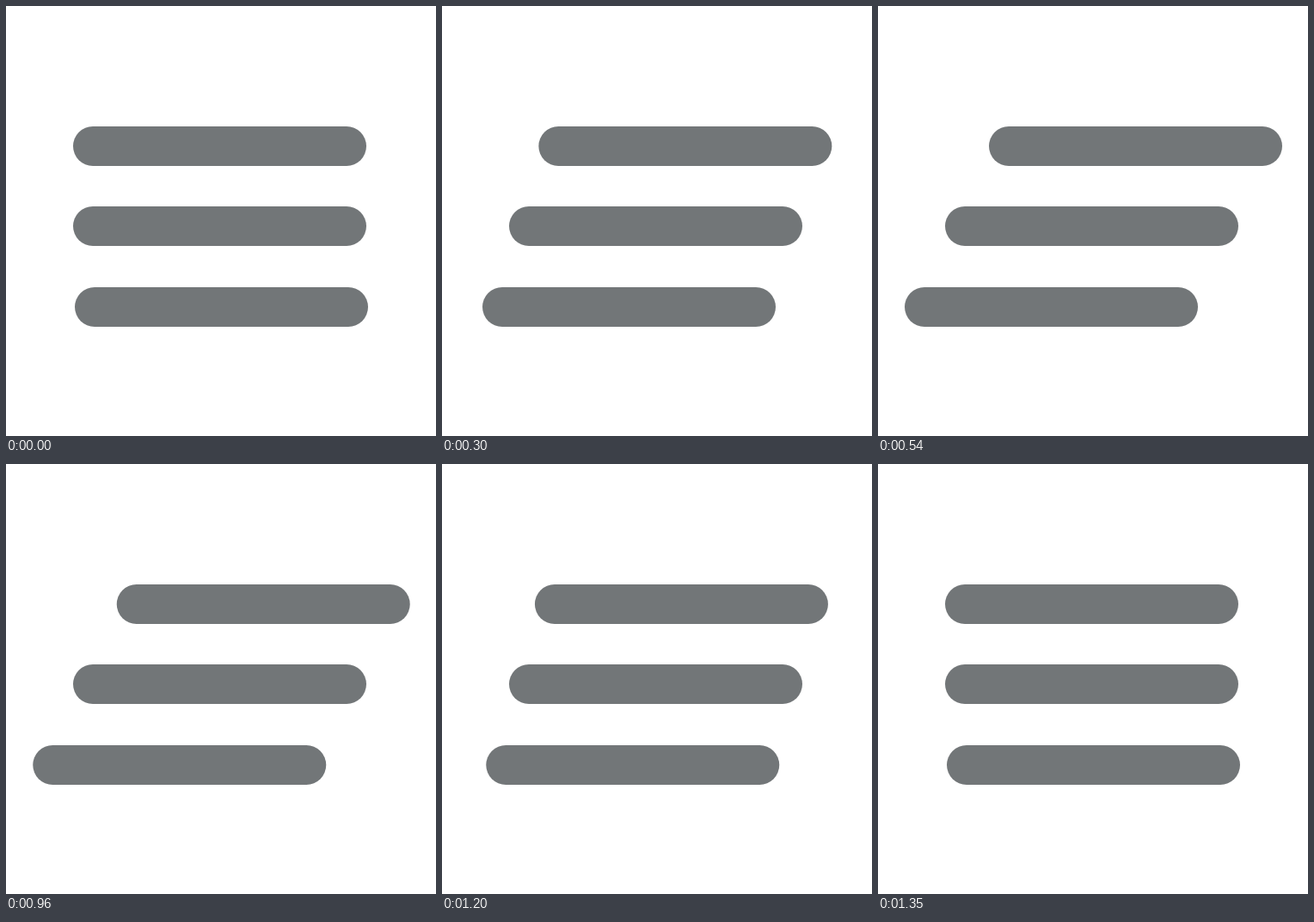
Animation, 500 px wide and 500 px high, one loop 1.5 s. Source, as an HTML page:

```html
<!DOCTYPE html>
<html lang="en">
<head>
<meta charset="utf-8">
<title>Sliding menu bars</title>
<style>
  /* Clock that counts 50 ticks of 30 ms per loop */
  @property --tick {
    syntax: "<number>";
    inherits: true;
    initial-value: 0;
  }

  html, body {
    margin: 0;
    width: 100%;
    height: 100%;
    overflow: hidden;
    background: #fff;
  }

  svg {
    display: block;
    width: 100%;
    height: 100%;
    fill: #727678;
    animation: clock 1500ms steps(50, end) infinite;
  }

  @keyframes clock {
    from { --tick: 0; }
    to { --tick: 50; }
  }

  /* Quadratic ease-out on the way apart, ease-in on the way back */
  rect {
    --left: calc(1 - clamp(0, (var(--tick) - 4) / 14, 1));
    --back: clamp(0, (var(--tick) - 31) / 14, 1);
    --shift: calc(1 - var(--left) * var(--left) - var(--back) * var(--back));
    transform: translateX(calc(var(--shift) * var(--reach)));
  }

  .top { --reach: 51px; }
  .middle { --reach: 0px; }
  .bottom { --reach: -49px; }
</style>
</head>
<body>
<svg viewBox="0 0 500 500">
  <rect class="top" x="78" y="140" width="341" height="46" rx="23"/>
  <rect class="middle" x="78" y="233" width="341" height="46" rx="23"/>
  <rect class="bottom" x="80" y="327" width="341" height="46" rx="23"/>
</svg>
</body>
</html>
```
